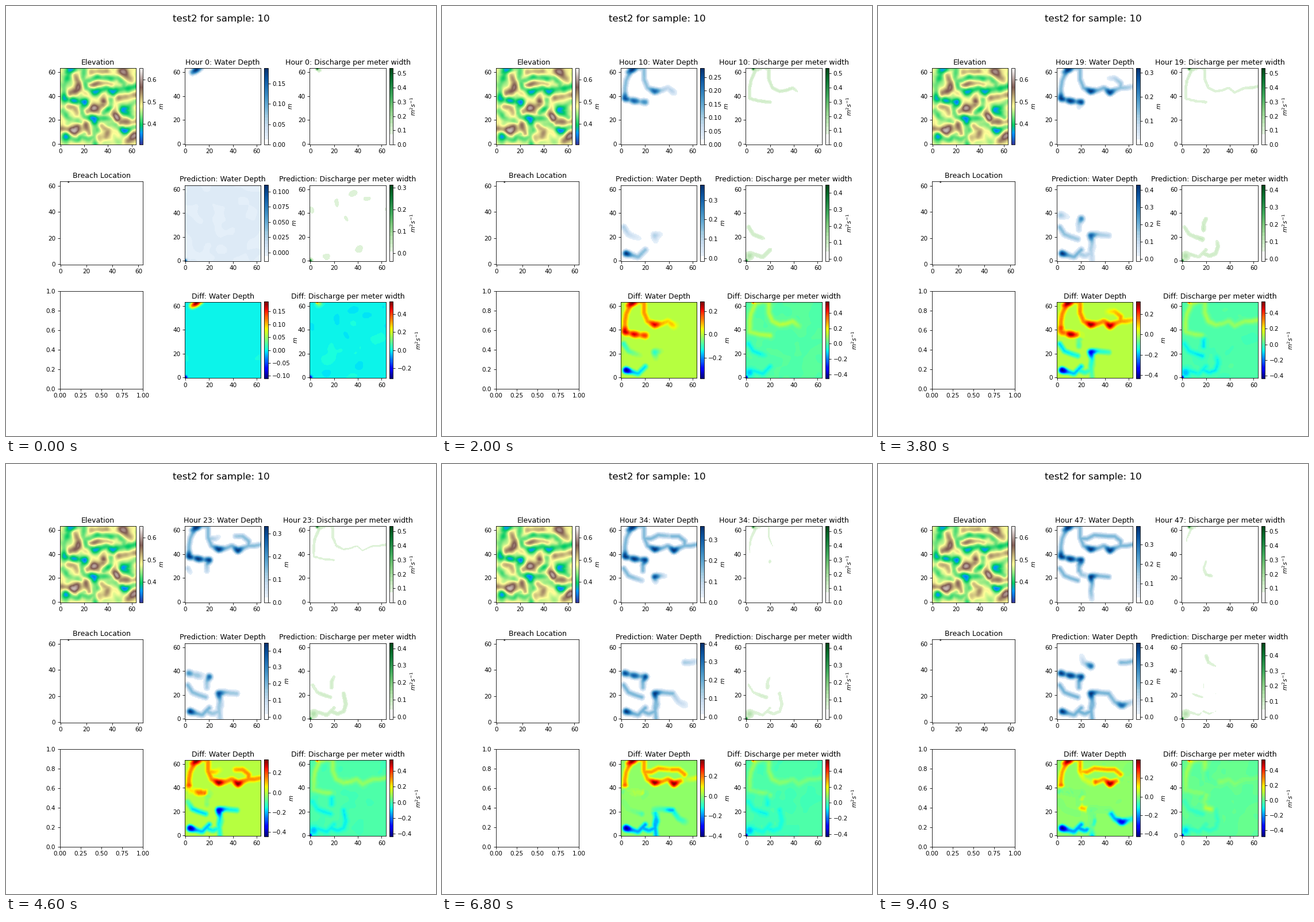
Recreate the animation shown at these times as a matplotlib script. Size 748x748 px, loop 9600 ms.

```python
import numpy as np
import matplotlib.pyplot as plt
from matplotlib.animation import FuncAnimation
from matplotlib.colors import ListedColormap

N = 64
FRAMES, INTERVAL = 48, 200
Y, X = np.mgrid[:N, :N]
Z_MIN, Z_MAX = .3056, .654
FLOW_MAX = .538

# Prediction peaks at key hours
HOURS = [0, 6, 15, 23, 30, 39, 47]
PRED_DEPTH_MAX = [.111, .35, .413, .447, .386, .428, .427]
PRED_FLOW_MAX = [.312, .468, .428, .432, .396, .468, .48]

# Valleys shared by the simulated and the predicted flood
WEST = [(3, 38), (11, 36), (20, 35)]
NOTCH = [(20, 35), (18, 31), (18, 26)]
SOUTHWEST = [(2, 28), (6, 22), (11, 20), (17, 18)]
SOUTH = [(28, 21), (29, 15), (28, 9), (29, 0)]
SHELF = [(28, 21), (33, 22), (43, 21)]
EAST = [(53, 47), (58, 47), (63, 48)]
CORNER = [(4, 6), (14, 3), (20, 9)]

# (start hour, path, carries a current)
REAL = [
    (-20, [(6, 60), (9, 62), (13, 64)], 0),
    (-.5, [(8, 62), (4, 53), (3, 47)] + WEST, 1),
    (-.5, [(9, 62), (14, 64), (19, 63), (19, 54), (22, 47), (28, 44),
           (34, 45), (39, 47), (44, 43), (48, 45)] + EAST, 1),
    (12, [(53, 47), (53, 51), (48, 55), (42, 55)], 0),
    (18, [(20, 53), (25, 53), (31, 56), (42, 55)], 0),
    (16, NOTCH, 0),
    (20, SOUTHWEST, 0),
    (27, SHELF, 0),
    (30, SOUTH, 0),
    (32, [(20, 34), (18, 28), (20, 23), (28, 21)], 1),
]
PRED = [
    (0, CORNER, 1),
    (5, SOUTHWEST, 1),
    (8, SOUTH, 0),
    (8, SHELF, 0),
    (10, [(18, 6), (23, 4), (28, 6), (30, 12), (28, 21)], 1),
    (11, NOTCH, 1),
    (16, WEST, 0),
    (24, [(43, 21), (48, 14), (54, 11), (63, 14)], 0),
    (24, EAST, 0),
    (35, [(28, 44), (22, 47), (19, 56)], 1),
]
DRY = [[(63, 36), (52, 28), (60, 22)], [(36, 26), (42, 31), (42, 37)]]
POOLS = [(9, 62), (3, 38), (11, 36), (20, 36), (28, 44), (44, 43),
         (28, 21), (4, 6), (52, 28), (54, 11)]

RIDGES = [
    [(12, 58), (15, 52), (14, 45), (9, 43)],
    [(25, 60), (38, 61)],
    [(25, 49), (32, 51), (42, 50)],
    [(50, 62), (54, 60), (60, 52)],
    [(63, 41), (49, 39)],
    [(36, 41), (36, 36)],
    [(6, 31), (11, 31), (14, 26)],
    [(23, 27), (28, 30), (35, 32)],
    [(47, 21), (44, 27)],
    [(1, 13), (12, 11), (14, 15)],
    [(21, 16), (24, 9)],
    [(35, 15), (40, 12), (38, 6)],
    [(57, 3), (62, 7)],
    [(62, 19), (50, 18)],
]
PEAKS = [(14, 45), (53, 61), (28, 30), (47, 22), (12, 11), (62, 6)]


def blob(x, y, s):
    return np.exp(-((X - x) ** 2 + (Y - y) ** 2) / (2 * s * s))


def walk(path):
    """Points about one cell apart, with the distance covered."""
    path = np.array(path, float)
    dist = np.r_[0, np.cumsum(np.hypot(*np.diff(path, axis=0).T))]
    s = np.linspace(0, dist[-1], int(dist[-1]) + 2)
    return np.interp(s, dist, path[:, 0]), np.interp(s, dist, path[:, 1]), s


def strength(x, y, spots):
    """About one at a marked spot, half of that elsewhere on a path."""
    near = min((x - a) ** 2 + (y - b) ** 2 for a, b in spots)
    return .48 + .55 * np.exp(-near / 14)


def tubes(xs, ys, weights):
    return np.array([blob(x, y, 1.5 + .9 * w)
                     for x, y, w in zip(xs, ys, weights)])


def profile(paths, spots):
    """Height of the tallest tube over all paths."""
    xs, ys, _ = np.hstack([walk(p) for p in paths])
    w = np.array([strength(x, y, spots) for x, y in zip(xs, ys)])
    return (w[:, None, None] * tubes(xs, ys, w)).max(0)


def smooth_noise(rng, s):
    k = np.fft.fftfreq(N)
    low = np.exp(-2 * (np.pi * s * np.hypot(k[:, None], k)) ** 2)
    f = np.fft.ifft2(np.fft.fft2(rng.normal(size=(N, N))) * low).real
    return f / f.std()


rng = np.random.default_rng(10)
NOISE = [smooth_noise(rng, 3) for _ in range(4)]


def elevation():
    valleys = [path for _, path, _ in REAL + PRED] + DRY
    z = (.5 + .32 * profile(RIDGES, PEAKS) - .36 * profile(valleys, POOLS)
         + .04 * smooth_noise(rng, 2))
    return Z_MIN + np.clip(z, 0, 1) * (Z_MAX - Z_MIN)


def flood(streams, breach, tau):
    """Return a function giving relative depth and current at an hour."""
    rows = []
    for start, path, current in streams:
        for x, y, s in zip(*walk(path)):
            # The front slows down as it travels
            arrival = (start + 7) * np.exp(s / 56) - 7
            # Currents near the breach last longest
            life = 16 + 150 * np.exp(-np.hypot(x - breach[0],
                                               y - breach[1]) / 18)
            rows.append((x, y, strength(x, y, POOLS), arrival, life, current))
    xs, ys, w, arrival, life, current = np.array(rows).T
    basin = np.clip(1.25 * tubes(xs, ys, w) - .25, 0, None)
    stream = np.array([blob(x, y, 1.6) for x, y in zip(xs, ys)])

    def at(t):
        age = np.clip(t - arrival, 0, None)
        fill = w * (1 - np.exp(-age / tau))
        flow = .23 * current * np.exp(-age / life) * (1 - np.exp(-age))
        return ((fill[:, None, None] * basin).max(0),
                (flow[:, None, None] * stream).max(0))
    return at


real_flood = flood(REAL, (6, 63), 3)
pred_flood = flood(PRED, (0, 0), 8)


def scaled(field, peak):
    return field * (peak / field.max())


def wobble(a, b, t):
    return NOISE[a] * np.cos(t / 2) + NOISE[b] * np.sin(t / 2)


def fields(t):
    """Six grids with their colour limits at hour t."""
    depth_max = .188 + .0305 * np.sqrt(t)
    pred_depth_max = np.interp(t, HOURS, PRED_DEPTH_MAX)
    pred_flow_max = np.interp(t, HOURS, PRED_FLOW_MAX)

    d, q = real_flood(t)
    d = scaled(d, depth_max)
    q = np.maximum(q, .28 * blob(7.5, 62, 1.8))
    q = scaled(np.maximum(q, blob(6, 63, .9)), FLOW_MAX)

    pd, pq = pred_flood(t)
    # Short-lived patches along the left and lower edges
    pulse = .08 * min(t / 6, 1) * np.exp(-max(t - 6, 0) / 4)
    patches = np.clip(NOISE[1] - .6, 0, 1) * np.exp(-np.minimum(X, Y) / 12)
    pd = np.maximum(pd, pulse * patches)
    pd = np.maximum(pd, np.exp(-t) * blob(0, 0, 1))
    pd = scaled(pd, pred_depth_max) + .0008 * wobble(0, 1, t)
    pq = np.maximum(pq, .3 * min(t / 5, 1) * blob(3, 4, 3))
    pq = np.maximum(pq, blob(0, 0, 1))
    pq = scaled(pq, pred_flow_max) + .0045 * wobble(2, 3, t)

    dd, dq = d - pd, q - pq
    return [(d, 0, depth_max),
            (q, 0, FLOW_MAX),
            (pd, -.015, pred_depth_max),
            (pq, -.015 - .024 * np.exp(-t / 3), pred_flow_max),
            (dd, dd.min(), dd.max()),
            (dq, dq.min(), dq.max())]


def banded(name, start, step):
    """Colormap with a white foot and a stepped pale end."""
    x = np.linspace(0, 1, 256)
    steps = start + np.floor((x - start) / step) * step + step / 2
    colors = plt.get_cmap(name)(np.where(x < .4, steps, x))
    colors[x < start] = 1
    return ListedColormap(colors)


fig, axs = plt.subplots(3, 3, figsize=(10, 10), dpi=74.8)
fig.subplots_adjust(left=.125, right=.9, bottom=.11, top=.88,
                    wspace=.5, hspace=.2)
fig.suptitle("test2 for sample: 10", fontsize=16)


def panel(ax, data, cmap, title, unit, lo, hi):
    im = ax.imshow(data, cmap=cmap, origin="lower", vmin=lo, vmax=hi)
    ax.set_title(title)
    fig.colorbar(im, ax=ax, fraction=.046, pad=.04).set_label(unit)
    return im


panel(axs[0, 0], elevation(), "terrain", "Elevation", "$m$", Z_MIN, Z_MAX)

breach_map = np.zeros((N, N))
breach_map[63, 6] = 1
axs[1, 0].imshow(breach_map, cmap="binary", origin="lower")
axs[1, 0].set_title("Breach Location")

JET = plt.get_cmap("jet", 64)
QUANTITIES = [
    ("Water Depth", "$m$", banded("Blues", .07, .04)),
    ("Discharge per meter width", "$m^2s^{-1}$", banded("Greens", .13, .05)),
]

images = []
first = iter(fields(0))
for row, prefix in enumerate(["Hour 0", "Prediction", "Diff"]):
    for col, (name, unit, cmap) in enumerate(QUANTITIES, 1):
        data, lo, hi = next(first)
        images.append(panel(axs[row, col], data, JET if row == 2 else cmap,
                            f"{prefix}: {name}", unit, lo, hi))


def update(hour):
    for im, (data, lo, hi) in zip(images, fields(hour)):
        im.set_data(data)
        im.norm.autoscale([lo, hi])
    for ax, (name, _, _) in zip(axs[0, 1:], QUANTITIES):
        ax.set_title(f"Hour {hour}: {name}")
    return images


anim = FuncAnimation(fig, update, frames=FRAMES, interval=INTERVAL,
                     repeat=True, repeat_delay=0, blit=False)
plt.show()
```
